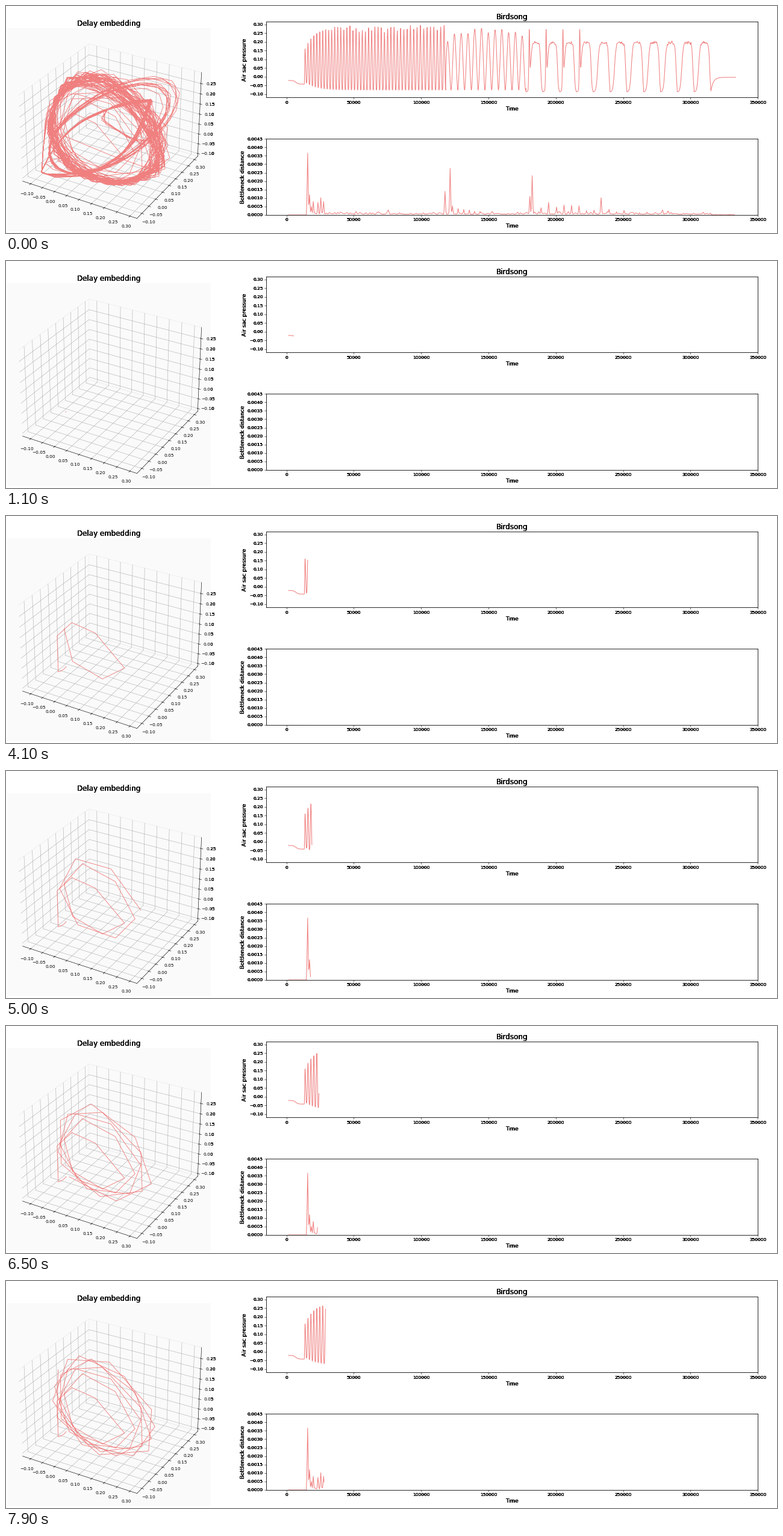
Recreate the animation shown at these times as a matplotlib script. Size 1280 by 378 pixels, loop 8 s.

```python
import numpy as np
import matplotlib.pyplot as plt
from matplotlib.animation import FuncAnimation
from matplotlib.transforms import Bbox, TransformedBbox

W, H, DPI = 1280, 378, 100
S = 160 / 3 / DPI          # scale of all point sizes
CORAL = "lightcoral"
FRAMES, INTERVAL = 80, 100

START, STEP, TOTAL = 1500, 348, 954
LAG = 480                  # embedding delay in time units
FINE = 4                   # pressure samples per step

# section borders and syllable length, in thousands of time units
ONSET, SLOW, SYLLABLES, END = 13.84, 118.3, 177.8, 315.1
SYLLABLE = (END - SYLLABLES) / 11

plt.rcParams.update({
    "font.family": "DejaVu Sans",
    "font.size": 10 * S,
    "axes.titlesize": 16 * S,
    "axes.titlepad": 6 * S,
    "axes.labelsize": 12 * S,
    "axes.labelpad": 4 * S,
    "axes.linewidth": 0.8 * S,
    "grid.linewidth": 0.8 * S,
    "lines.linewidth": 1.4 * S,
    "patch.linewidth": S,
})
for side in ("xtick", "ytick"):
    plt.rcParams.update({
        f"{side}.major.size": 3.5 * S,
        f"{side}.major.pad": 3.5 * S,
        f"{side}.major.width": 0.8 * S,
    })

rng = np.random.default_rng(7)
cycle_jitter = np.clip(rng.normal(0, 0.014, 60), -0.03, 0.01)
cycle_jitter[:8] = 0
plateau_noise = rng.normal(0, 0.005, 400)


# ---- signals; t is in thousands of time units ----

def sigmoid(x):
    return 1 / (1 + np.exp(-np.clip(x, -50, 50)))


def fade(t, start, length):
    return np.exp(-np.maximum(t - start, 0) / length)


def trill(t):
    """Quick pulses that slow down a little, then a slower, rounder group."""
    since = np.maximum(t - ONSET, -2)
    slow = t > SLOW
    cycle = np.where(slow, 45 + (t - 119.7) / 5.03,
                     since / (2.16 + 0.0018 * since))
    top = np.where(slow, 0.225 + 0.045 * np.sin(np.pi * (t - 119.7) / 60),
                   0.285 - 0.125 * fade(t, ONSET, 7))
    low = -0.076 + 0.046 * fade(t, ONSET, 8)
    number = np.clip(np.round(cycle), 0, 59).astype(int)
    wave = 0.5 + 0.5 * np.cos(2 * np.pi * cycle)
    wave = wave ** np.where(slow, 0.9, 1.5)
    return low + (top + cycle_jitter[number] - low) * wave


def opening(t):
    rest = -0.021 - 0.021 * sigmoid((t - 7) / 0.9)
    return rest + (trill(t) - rest) * np.clip((t - 13.3) / 0.4, 0, 1)


def syllables(t):
    """Long plateaus between dips; the first four start with a spike."""
    number, u = np.divmod((t - SYLLABLES) / SYLLABLE, 1)
    spiked = number < 4
    hold = (sigmoid((u - 0.27) / 0.045)
            * sigmoid((np.where(spiked, 0.88, 0.93) - u) / 0.028))
    spike = spiked * 0.31 * np.exp(-((u - 0.2) / 0.035) ** 2)
    noise = np.interp(t, np.linspace(SYLLABLES, END, 400), plateau_noise)
    bow = 0.015 * np.sin(np.pi * u)
    return -0.087 + (0.27 + bow + noise) * hold + spike


def pressure(time):
    t = time / 1000
    ending = -0.003 - 0.08 * fade(t, END, 1.8)
    return np.select([t < SYLLABLES, t < END], [opening(t), syllables(t)],
                     ending)


def echoes(start, gap, count, height, length):
    """A train of spikes that die away."""
    return [(start + gap * k,
             height * np.exp(-k / length) * rng.uniform(0.35, 1))
            for k in range(count)]


def bottleneck(time):
    """Spikes at each change of rhythm over a noisy floor, in 1e-5."""
    t = time / 1000
    grid = np.arange(t[0], t[-1] + 1, 3 * STEP / 1000)
    noise = np.minimum(4 + rng.exponential(5, grid.size), 30)
    floor = np.interp(t, grid, noise)
    floor[t < 15] = 0
    floor[t > END] *= 0.1
    spikes = [(15.75, 366), (17.2, 120), (18.7, 50), (20.1, 80), (23.5, 75),
              (25.5, 102), (27.7, 80), (117.9, 140), (121.4, 275),
              (180.7, 110), (182.3, 232), (233.5, 102)]
    spikes += echoes(123.4, 4.1, 6, 75, 4)
    spikes += echoes(189.2, 5.6, 20, 95, 9)
    index = np.arange(t.size)
    for when, height in spikes:
        offset = np.abs(index - np.abs(t - when).argmin())
        floor = np.maximum(floor, height * (1 - offset / 2.4))
    return floor * 1e-5


time = START + STEP * np.arange(TOTAL + 1)
fine_time = START + STEP / FINE * np.arange(TOTAL * FINE + 1)
fine_pressure = pressure(fine_time)
distance = bottleneck(time)
first = int(np.ceil(2 * LAG / STEP))
orbit = [pressure(time[first:] - k * LAG) for k in (2, 1, 0)]


# ---- figure ----

fig = plt.figure(figsize=(W / 100, H / 100), dpi=DPI, facecolor="white")


def place(left, top, right, bottom):
    return [left / W, 1 - bottom / H, (right - left) / W, (bottom - top) / H]


def thicken(artist, times=4):
    """Paint an artist repeatedly so that its soft edges grow darker."""
    draw = artist.draw

    def repeat(renderer):
        for _ in range(times):
            draw(renderer)

    artist.draw = repeat


def thicken_inside(label, box):
    """Paint a label once, and again only where it lies inside box."""
    draw = label.draw
    label.set_clip_box(box)

    def repeat(renderer):
        label.set_clip_on(False)
        draw(renderer)
        label.set_clip_on(True)
        for _ in range(3):
            draw(renderer)

    label.draw = repeat


def flat_axes(top, bottom, ylabel, ylim, yticks):
    ax = fig.add_axes(place(432, top, 1248.2, bottom))
    ax.set(xlim=(-15000, 350000), ylim=ylim, xlabel="Time", ylabel=ylabel)
    ax.set_xticks(np.arange(0, 350001, 50000))
    ax.set_yticks(yticks)
    for text in (ax.xaxis.label, ax.yaxis.label,
                 *ax.get_xticklabels(), *ax.get_yticklabels()):
        thicken(text)
    for spine in ax.spines.values():
        thicken(spine, 2)
    line, = ax.plot([], [], color=CORAL)
    return ax, line


song_ax, song_line = flat_axes(26, 152.4, "Air sac pressure",
                               (-.119, .317), np.arange(-2, 7) / 20)
thicken(song_ax.set_title("Birdsong"))
_, dist_line = flat_axes(221.2, 348, "Bottleneck distance",
                         (0, .0045), np.arange(10) / 2000)

space = fig.add_axes(place(2, 37, 340, 375), projection="3d",
                     facecolor="#fafafa")
orbit_line, = space.plot([], [], [], color=CORAL, lw=1.2 * S)
space.set(xlim=(-.134, .327), ylim=(-.134, .327), zlim=(-.1144, .3034))
space.set_xticks(np.arange(-2, 7) / 20)
space.set_yticks(np.arange(-2, 7) / 20)
space.set_zticks(np.arange(-2, 6) / 20)
space.tick_params(pad=13.5 * S - 8)
for axis in (space.xaxis, space.yaxis, space.zaxis):
    axis.set_pane_color((.98, .98, .98, 1))
    axis.pane.set_edgecolor("#ececec")
title = space.set_title("Delay embedding", y=1)
title.set_y(1)             # 3D axes lower their title by default
thicken(title)
outside = TransformedBbox(Bbox([[340 / W, 0], [1, 1]]), fig.transFigure)
for label in space.zaxis.get_ticklabels():
    thicken_inside(label, outside)


def update(i):
    n = i if i else TOTAL      # the loop opens on the finished picture
    m = n * FINE + 1
    song_line.set_data(fine_time[:m], fine_pressure[:m])
    k = max(n + 1 - first, 0)
    dist_line.set_data(time[:k], distance[:k])
    orbit_line.set_data_3d(*(c[:k] for c in orbit))
    return song_line, dist_line, orbit_line


anim = FuncAnimation(fig, update, frames=FRAMES, interval=INTERVAL,
                     repeat=True, repeat_delay=0, cache_frame_data=False)
plt.show()
```
